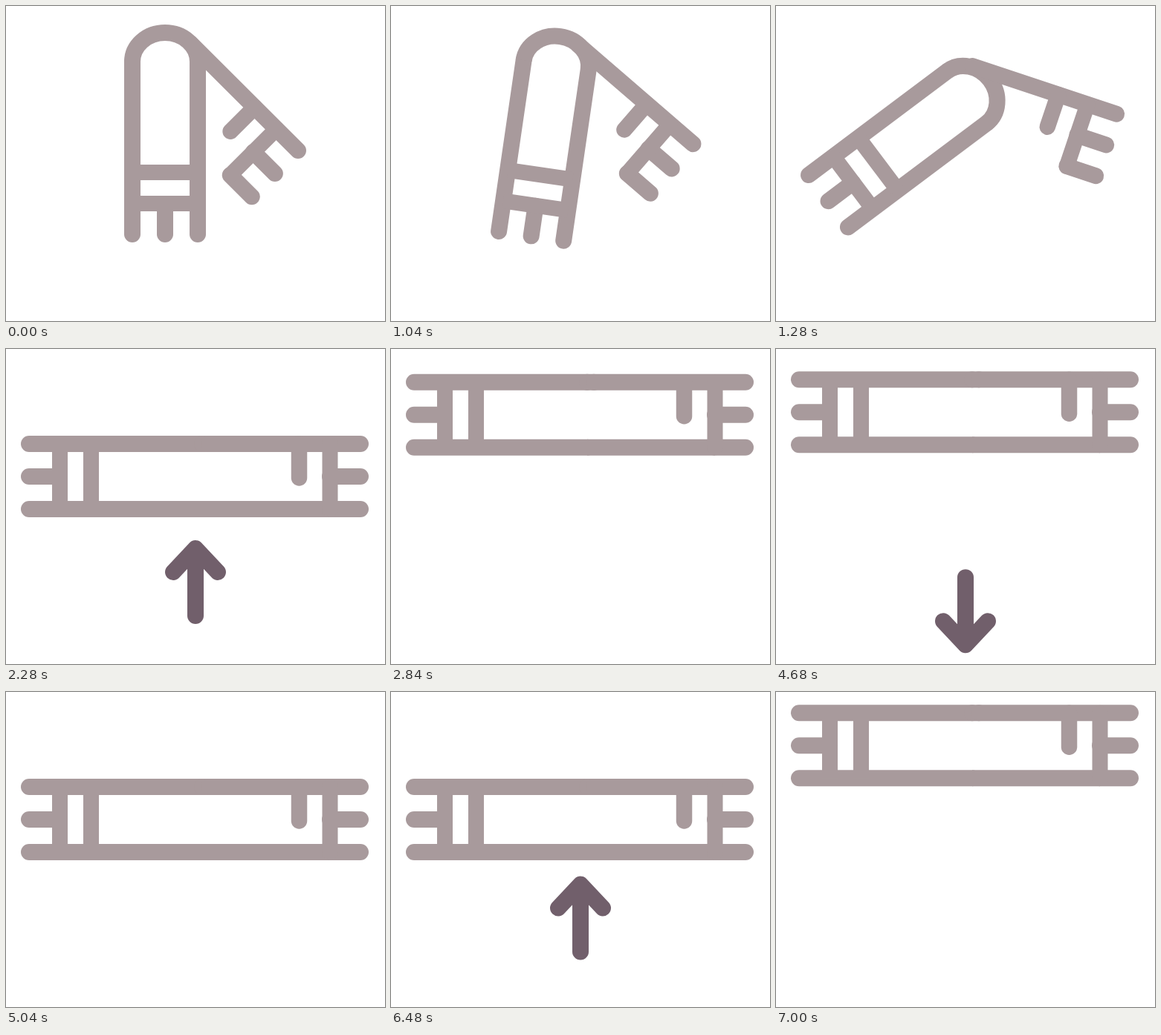
Write an HTML page with a canvas that moves like this. It is 510 px wide and 425 px high and loops after 8000 ms.

```html
<!DOCTYPE html>
<html lang="en">
<head>
<meta charset="utf-8">
<title>Scarf</title>
<style>
  html, body { margin: 0; width: 100%; height: 100%; overflow: hidden; background: #fff; }
  canvas { display: block; width: 510px; height: 425px; }
</style>
</head>
<body>
<canvas id="stage" width="510" height="425"></canvas>
<script>
const ctx = document.getElementById('stage').getContext('2d');
const LOOP = 8000;
const CLOTH = '#a89a9c';
const ARROW = '#715f6b';
const TOP = 128, MID = 172, LOW = 216;

// Each move shows an arrow first, then shifts the scarf by 100 px.
const moves = [
  { arrow: 1960, hide: 2800, shift: 2628, dir: -1 },
  { arrow: 3990, hide: 4840, shift: 4632, dir: 1 },
  { arrow: 5960, hide: 6800, shift: 6628, dir: -1 }
];

const clamp = x => Math.min(1, Math.max(0, x));
const lerp = (a, b, k) => a + (b - a) * k;
const mix = (a, b, k) => [lerp(a[0], b[0], k), lerp(a[1], b[1], k)];

// cubic-bezier(.25, .1, .25, 1)
function ease(x) {
  if (x <= 0 || x >= 1) return clamp(x);
  let lo = 0, hi = 1, s = 0.5;
  for (let i = 0; i < 24; i++) {
    s = (lo + hi) / 2;
    if (0.75 * s * (1 - s) + s * s * s < x) lo = s; else hi = s;
  }
  const r = 1 - s;
  return 0.3 * r * r * s + 3 * r * s * s + s * s * s;
}

// Rigid frame: turns by angle around a pivot that slides from a to b.
function frame(a, b, degrees, p) {
  const pivot = mix(a, b, p);
  const turn = degrees * (1 - p) * Math.PI / 180;
  const c = Math.cos(turn), s = Math.sin(turn);
  return (x, y) => {
    const dx = x - b[0], dy = y - b[1];
    return [pivot[0] + dx * c - dy * s, pivot[1] + dx * s + dy * c];
  };
}

function line(a, b, cap = 'round', width = 22) {
  ctx.lineCap = cap;
  ctx.lineWidth = width;
  ctx.beginPath();
  ctx.moveTo(...a);
  ctx.lineTo(...b);
  ctx.stroke();
}

function drawScarf(p) {
  const left = frame([206, 131], [208, 164], -90, p);
  const right = frame([146.2, 231], [328, 328], 45, p);
  const open = clamp((p - 0.85) / 0.15);
  ctx.strokeStyle = CLOTH;

  line(left(31, TOP), left(264, TOP));
  line(left(31, MID), left(72, MID));
  line(left(31, LOW), left(264, LOW));
  line(left(72.5, TOP), left(72.5, LOW), 'butt', 21);
  line(left(114.5, TOP), left(114.5, LOW), 'butt', 21);

  // The fold at the neck straightens into the lower edge.
  const fold = [
    [285.5, LOW], [303, 196.3], [303, MID],
    [303, 147.7], [285.5, TOP], [264, TOP]
  ].map(([x, y], i) =>
    mix(left(x, y), right(264 + 172 * (i + 1) / 6, LOW), open));
  ctx.lineWidth = 22;
  ctx.beginPath();
  ctx.moveTo(...left(264, LOW));
  ctx.bezierCurveTo(...fold[0], ...fold[1], ...fold[2]);
  ctx.bezierCurveTo(...fold[3], ...fold[4], ...fold[5]);
  ctx.stroke();
  if (open > 0) line(left(264, TOP), right(273, TOP));

  line(right(273, TOP), right(477, TOP));
  line(right(436, MID), right(477, MID));
  line(right(436, LOW), right(477, LOW));
  line(right(436, TOP), right(436, LOW), 'round', 21);
  line(right(394.5, TOP), right(394.5, 174), 'round', 21.5);
}

function drawArrow(age, dir) {
  const back = 2.5 * clamp((age - 560) / 240);
  const d = Math.min(25.5, age * 0.05) - back;
  ctx.save();
  ctx.translate(255, 330 + dir * d);
  ctx.scale(1, dir);
  ctx.strokeStyle = ARROW;
  ctx.lineWidth = 22;
  ctx.lineCap = ctx.lineJoin = 'round';
  ctx.beginPath();
  ctx.moveTo(0, -46);
  ctx.lineTo(0, 45);
  ctx.moveTo(-30, 13);
  ctx.lineTo(0, 45);
  ctx.lineTo(30, 13);
  ctx.stroke();
  ctx.restore();
}

function draw(t) {
  ctx.fillStyle = '#fff';
  ctx.fillRect(0, 0, 510, 425);
  let y = 0;
  for (const m of moves) {
    y += 100 * m.dir * ease((t - m.shift) / 400);
    if (t >= m.arrow && t < m.hide) drawArrow(t - m.arrow, m.dir);
  }
  ctx.save();
  ctx.translate(0, y);
  drawScarf(Math.sin(clamp((t - 1000) / 700) * Math.PI / 2));
  ctx.restore();
}

function tick() {
  draw(performance.now() % LOOP);
  requestAnimationFrame(tick);
}
tick();
</script>
</body>
</html>
```
